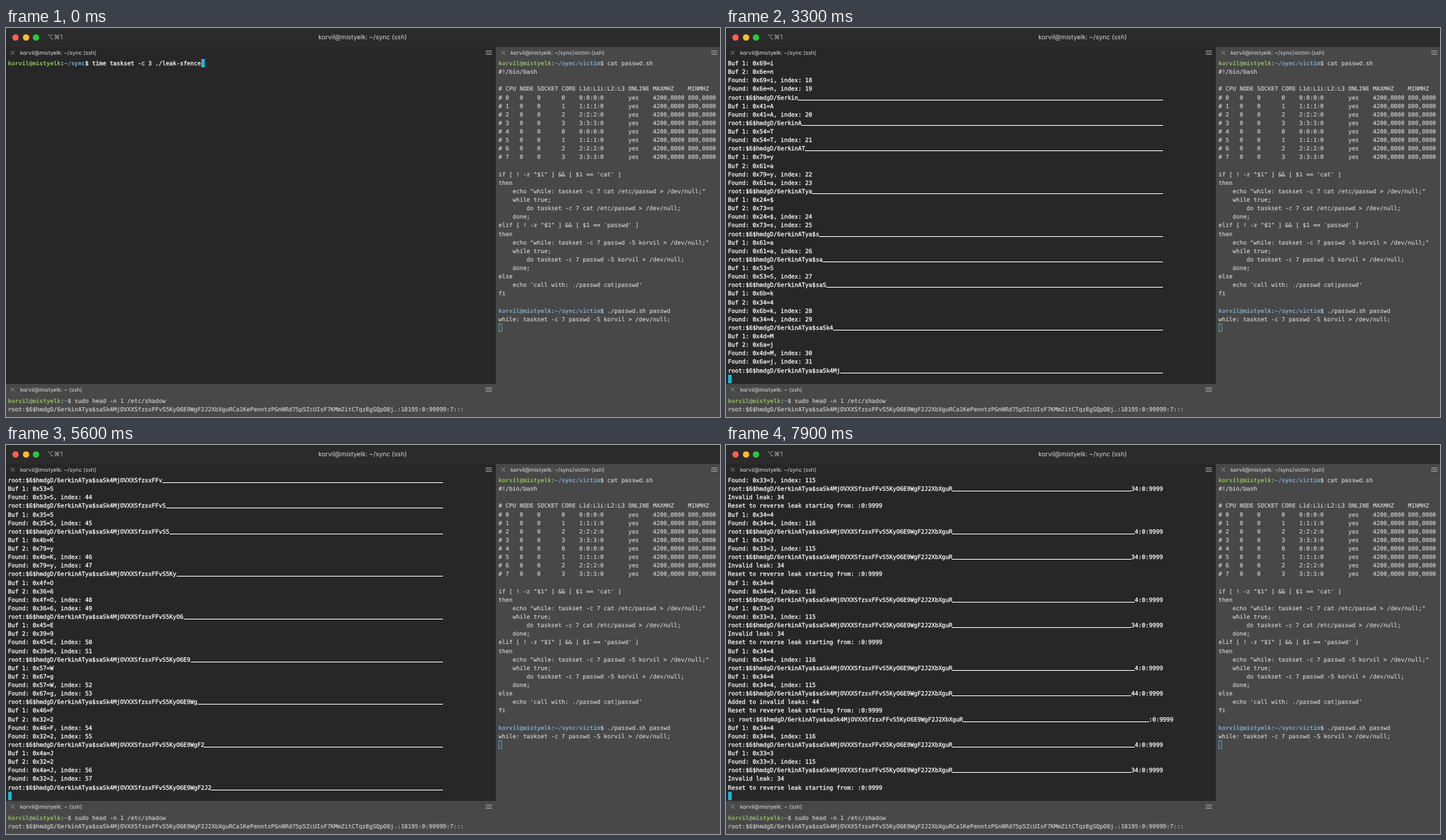
An HTML page for the animation above (8000 ms loop, 1013 by 553 pixels).

```html
<!DOCTYPE html>
<html lang="en">
<head>
<meta charset="utf-8">
<title>Terminal</title>
<style>
  html, body { margin: 0; width: 100%; height: 100%; overflow: hidden; background: #272727; }
  #stage { position: relative; width: 1013px; height: 553px; overflow: hidden;
    text-rendering: geometricPrecision; }
  #stage > *, .pane > * { position: absolute; }
  .bar { left: 0; top: 0; width: 1013px; height: 27px; background: #2b2b2b; }
  .dot { top: 9px; width: 9px; height: 9px; border-radius: 50%; }
  .keys { left: 58.5px; top: 7px; font: 9px/13px Inter, "DejaVu Sans", sans-serif; color: #b0b0b0; }
  .title { left: 0; width: 1012px; top: 7px; text-align: center;
    font: 9px/13px Inter, sans-serif; color: #d6d6d6; }
  .pane { overflow: hidden; background: #484848; color: #d2d2d2; --user: #93b862; --path: #79a8cb; }
  .active { background: #272727; color: #fff; --user: #92c255; --path: #70aedb; }
  .name { left: 20px; top: 2px; font: 7.78px/12px Inter, sans-serif; color: #dcdcdc; white-space: pre; }
  .pane svg { left: 0; top: 0; fill: none; stroke: #a0a0a0; }
  pre { left: 2.8px; top: 17px; margin: 0; -webkit-text-stroke: .15px;
    font: 8.28px/12.125px "DejaVu Sans Mono", monospace; }
  .active pre { -webkit-text-stroke-width: .25px; }
  pre b { color: var(--user); -webkit-text-stroke-width: 0; }
  pre b + b { color: var(--path); }
  /* unknown characters: a solid rule just below the baseline */
  pre s { color: transparent; text-decoration: none; -webkit-text-stroke-width: 0;
    background: linear-gradient(#fff 0 0) 0 8px / 100% 1px no-repeat; }
  .cursor { width: 5px; height: 12px; background: #16b8d6; }
  .idle { box-sizing: border-box; background: none; border: 1px solid #3aa9c4; }
</style>
</head>
<body>
<div id="stage">
  <div class="bar"></div>
  <i class="dot" style="left:9px;background:#ff5f57"></i>
  <i class="dot" style="left:23.5px;background:#febc2e"></i>
  <i class="dot" style="left:38px;background:#28c840"></i>
  <div class="keys">⌥⌘1</div>
  <div class="title">korvil@mistyelk: ~/sync (ssh)</div>
  <div class="pane active" id="leak" style="left:0;top:27px;width:694px;height:479px"></div>
  <div class="pane" id="victim" style="left:695px;top:27px;width:318px;height:526px"></div>
  <div class="pane" id="shadow" style="left:0;top:506px;width:695px;height:47px"></div>
</div>
<script>
const LOOP = 8000, ROWS = 38, CELL = 4.985, PITCH = 12.125;
const USER = 'korvil', HOST = 'mistyelk';
const HASH = 'root:$6$hmdgD/6erkinATya$saSk4MjOVXXSfzsxFFvS5KyO6E9WgF2J2XbXguR';
const REST = 'Ca1KePenntzPGnNRd75p5ZcUIsF7KMmZitCTqzEgSQpO8j.:18195:0:99999:7:::';
const TAIL = ':0:9999', LENGTH = 124;

const prompt = (path, cmd) => `<b>${USER}@${HOST}</b>:<b>${path}</b>$ ${cmd}`;
const hex = c => `0x${c.charCodeAt(0).toString(16)}=${c}`;
const fill = (head, tail = '') =>
  `${head}<s>${'_'.repeat(LENGTH - head.length - tail.length)}</s>${tail}`;
const header = secret => ['Secret: ' + secret, '', '#'.repeat(60), ''];

function pane(id, path, menuX, lines) {
  const el = document.getElementById(id);
  el.innerHTML = `<svg width="${menuX + 10}" height="16">
    <path d="M6.5 5l6 6m0-6l-6 6" stroke-width=".8"/>
    <path d="M${menuX - 4.5} 5.5h9m-9 2.5h9m-9 2.5h9"/></svg>
    <div class="name">${USER}@${HOST}: ${path} (ssh)</div><pre></pre>`;
  const pre = el.querySelector('pre');
  pre.innerHTML = lines.join('\n');
  return pre;
}

function addCursor(id, cls) {
  const el = document.createElement('i');
  el.className = cls;
  document.getElementById(id).append(el);
  return (row, col, left) => {
    el.style.left = Math.round(left + col * CELL) + 'px';
    el.style.top = Math.round(17 + row * PITCH) + 'px';
  };
}

// Static panes
const cpus = Array.from({ length: 8 }, (_, i) => {
  const c = i % 4;
  return `# ${i}   0    0      ${c}    ${c}:${c}:${c}:0       yes    4200,0000 800,0000`;
});
const branch = cmd => [
  'then',
  `    echo "while: taskset -c 7 ${cmd} &gt; /dev/null;"`,
  '    while true;',
  `        do taskset -c 7 ${cmd} &gt; /dev/null;`,
  '    done;'
];
const test = arg => `[ ! -z "$1" ] &amp;&amp; [ $1 == '${arg}' ]`;
const status = `passwd -S ${USER}`;

pane('victim', '~/sync/victim', 309, [
  prompt('~/sync/victim', 'cat passwd.sh'),
  '#!/bin/bash', '',
  '# CPU NODE SOCKET CORE L1d:L1i:L2:L3 ONLINE MAXMHZ    MINMHZ',
  ...cpus, '',
  'if ' + test('cat'), ...branch('cat /etc/passwd'),
  'elif ' + test('passwd'), ...branch(status),
  'else', "    echo 'call with: ./passwd cat|passwd'", 'fi', '',
  prompt('~/sync/victim', './passwd.sh passwd'),
  `while: taskset -c 7 ${status} &gt; /dev/null;`
]).style.left = '3.8px';
document.querySelector('#victim .name').style.left = '21px';
document.querySelector('#victim svg').style.left = '.5px';
addCursor('victim', 'cursor idle')(31, 0, 4);

pane('shadow', '~', 685, [
  prompt('~', 'sudo head -n 1 /etc/shadow'),
  HASH + REST
]).style.top = '18px';

// Leak log: [time, lines] in printing order
const command = prompt('~/sync', 'time taskset -c 3 ./leak-sfence');
const log = [[0, [command]]];
const print = (time, ...lines) => log.push([time, lines]);

// Time at which each known index has been leaked
const pace = [[6, 600], [19, 2450], [31, 3250], [49, 4450], [57, 5550], [59, 5780], [61, 5980], [63, 6080]];
function leakTime(i) {
  const k = pace.findIndex(p => p[0] >= i);
  const [i0, t0] = pace[k - 1], [i1, t1] = pace[k];
  return t0 + (t1 - t0) * (i - i0) / (i1 - i0);
}

print(200, ...header(fill(HASH.slice(0, 7))));
let at = 7;
for (const size of '212121112112211222212112111222222222') {
  const chars = [...HASH.slice(at, at + Number(size))];
  if (!chars.length) break;
  const start = at;
  at += chars.length;
  print(leakTime(at - 1),
    ...chars.map((c, k) => `Buf ${k + 1}: ${hex(c)}`),
    ...chars.map((c, k) => `Found: ${hex(c)}, index: ${start + k}`),
    fill(HASH.slice(0, at)));
}

// Reverse leak, retried every 100 ms
const known = fill(HASH, TAIL);
const back = (c, index, tail) =>
  [`Buf 1: ${hex(c)}`, `Found: ${hex(c)}, index: ${index}`, fill(HASH, tail + TAIL)];
print(6180, '', ...header(known));
for (let n = 0; n < 15; n++) {
  const end = 6480 + n * 100;
  const c = n === 13 ? '4' : '3', bad = c + '4';
  const fresh = n === 0 || n === 13;
  print(end - 50, ...back('4', 116, '4'));
  print(end, ...back(c, 115, bad),
    (fresh ? 'Added to invalid leaks: ' : 'Invalid leak: ') + bad,
    'Reset to reverse leak starting from: ' + TAIL,
    ...(fresh ? ['s: ' + known] : []));
}

const screen = pane('leak', '~/sync', 685, []);
const moveCursor = addCursor('leak', 'cursor');
let shown = 0;

function draw() {
  const t = performance.now() % LOOP;
  const count = log.filter(e => e[0] <= t).length;
  if (count !== shown) {
    shown = count;
    const lines = log.slice(0, count).flatMap(e => e[1]).slice(1 - ROWS);
    screen.innerHTML = lines.join('\n');
    if (count === 1) moveCursor(0, 55, 3);
    else moveCursor(lines.length, 0, 3);
  }
  requestAnimationFrame(draw);
}
draw();
</script>
</body>
</html>
```
